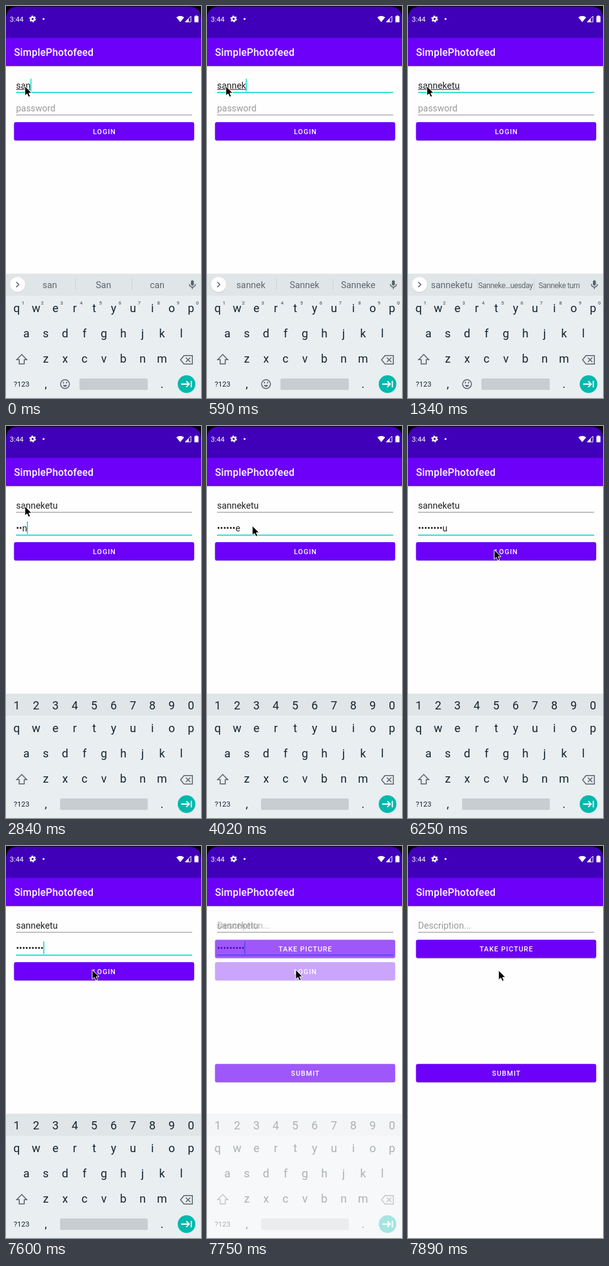
Animation, 310 px wide and 621 px high, one loop 8 s. Source, as an HTML page:

```html
<!DOCTYPE html>
<html lang="en">
<head>
<meta charset="utf-8">
<title>Login</title>
<style>
  html, body { margin: 0; width: 100%; height: 100%; overflow: hidden; background: #fefefe; }
  svg { display: block; width: 100%; height: 100%; font-family: Roboto, sans-serif; }
  .title { font-size: 16px; font-weight: 500; letter-spacing: .2px; fill: #fff; }
  .field { font-size: 14.4px; fill: #222; }
  .hint { font-size: 14.4px; fill: #999; }
  .label { font-size: 11px; font-weight: 500; letter-spacing: 1px; fill: #fff; text-anchor: middle; }
  .key { font-size: 18.2px; fill: #14242d; text-anchor: middle; }
  .sup { font-size: 8px; font-weight: 500; fill: #5c686f; text-anchor: middle; }
  .word { font-size: 14.4px; fill: #5c686f; text-anchor: middle; }
  .word.tight { font-size: 12.2px; letter-spacing: -.45px; }
  .icon { fill: none; stroke: #56636b; stroke-width: 1.5; }
</style>
</head>
<body>
<svg viewBox="0 0 310 621" preserveAspectRatio="none">
  <defs>
    <g id="bars">
      <rect width="310" height="60" fill="#08060c"/>
      <path d="M0 51V21Q0 1 20 1H290Q310 1 310 21V51Z" fill="#4000b9"/>
      <rect y="95" width="310" height="1" opacity=".2"/>
      <rect y="96" width="310" height="1.5" opacity=".06"/>
      <rect y="50.5" width="310" height="44.5" fill="#6c00f8"/>
      <text class="title" x="12.7" y="79">SimplePhotofeed</text>
      <g fill="#fff">
        <text x="6" y="24.7" font-size="11.4">3:44</text>
        <circle cx="42.3" cy="20.5" r="2.9" fill="none" stroke="#fff" stroke-width="2.3"/>
        <circle cx="42.3" cy="20.5" r="4.6" fill="none" stroke="#fff" stroke-width="1.5" stroke-dasharray="2.4 2.417"/>
        <circle cx="59.7" cy="20.5" r="1.6"/>
        <path d="M270.8 18Q277 13.6 283.2 18L277 25.6Z"/>
        <path d="M285 25.2L294 16V25.2Z" fill="none" stroke="#fff"/>
        <path d="M285 25.2L290.5 19.6V25.2Z"/>
        <path d="M299.5 16.2H301.3V15H304.2V16.2H306V25.7H299.5Z"/>
      </g>
    </g>
  </defs>

  <rect width="310" height="621" fill="#fefefe"/>
  <use href="#bars"/>
  <g id="login">
    <text class="field" id="user" x="16" y="130.7"></text>
    <rect id="composing" x="16" y="131.8" height="1" fill="#222"/>
    <rect id="userLine" x="16" width="280"/>
    <text class="hint" id="passHint" x="16" y="166.7">password</text>
    <text class="field" id="pass" x="16" y="166.7"></text>
    <rect id="passLine" x="16" width="280"/>
    <rect id="caret" width="1.6" height="20" fill="#12dcc8"/>
    <g data-button="LOGIN" data-y="184"></g>
    <rect id="ripple" x="12.7" y="184" width="286.5" height="29" rx="3" fill="#fff" opacity=".24"/>
  </g>

  <g id="keyboard">
    <rect y="424" width="310" height="197" fill="#e9eef1"/>
    <rect y="424" width="310" height="35" fill="#e0e5e8"/>
    <g id="textMode">
      <circle cx="18.3" cy="442" r="12.2" opacity=".12"/>
      <circle cx="18.3" cy="441.3" r="12" fill="#fff"/>
      <path class="icon" d="M16.3 437.2L20.4 441.3L16.3 445.4"/>
      <path d="M110.5 432V450M200.5 432V450" stroke="#cdd3d6"/>
      <text class="word" x="69.7" y="446.7"></text>
      <text class="word" x="155" y="446.7"></text>
      <text class="word" x="240.3" y="446.7"></text>
      <rect x="294" y="434.5" width="4.6" height="8.5" rx="2.3" fill="#56636b"/>
      <path class="icon" stroke-width="1.2" d="M291.5 440.5A4.8 4.8 0 0 0 301.1 440.5M296.3 445V448.5"/>
      <g id="sups"></g>
      <g class="icon">
        <circle cx="93.8" cy="599" r="7"/>
        <path d="M90 600.5Q93.8 606.2 97.6 600.5Z" fill="#56636b" stroke="none"/>
        <path d="M91.3 595.5V597.7M96.3 595.5V597.7" stroke-width="1.9"/>
      </g>
    </g>
    <g id="digits"></g>
    <g id="keys"></g>
    <text class="key" x="24.7" y="603" style="font-size:11.6px">?123</text>
    <rect id="space" y="590" height="18.3" rx="2" fill="#c8cdd1"/>
    <path class="icon" d="M25 552L33 560.3H29V567H21V560.3H17Z"/>
    <path class="icon" d="M277.5 560.5L283 553.7H296.3V567.3H283ZM286 557L293 564M293 557L286 564"/>
    <circle cx="287" cy="599" r="14" fill="#00b9ac"/>
    <path d="M278.5 599H291M286.6 594.3L291.3 599L286.6 603.7M294.6 593.7V604.3" fill="none" stroke="#fff" stroke-width="1.9"/>
  </g>

  <g id="compose">
    <rect width="310" height="621" fill="#fefefe"/>
    <use href="#bars"/>
    <text class="hint" x="16" y="130.7">Description...</text>
    <rect x="16" y="136.2" width="280" height="1" fill="#8b8b8b"/>
    <g data-button="TAKE PICTURE" data-y="148.5"></g>
    <g data-button="SUBMIT" data-y="345.3"></g>
  </g>

  <path id="mouse" d="M0 0V15.2L3.5 12L5.9 17.2L8.6 16L6.3 11H11Z" fill="#000" stroke="#fff"/>
</svg>
<script>
const LOOP = 8000;
const NAME = 'sanneketu';
const PITCH = 30.8;
const $ = id => document.getElementById(id);
const words = [...document.querySelectorAll('.word')];

function addText(parent, cls, x, y, text) {
  const el = document.createElementNS('http://www.w3.org/2000/svg', 'text');
  el.setAttribute('class', cls);
  el.setAttribute('x', x);
  el.setAttribute('y', y);
  el.textContent = text;
  parent.append(el);
}

function addRow(id, cls, text, x, y) {
  [...text].forEach((ch, i) => addText($(id), cls, x + i * PITCH, y, ch));
}

addRow('sups', 'sup', '1234567890', 27, 472.5);
addRow('digits', 'key', '1234567890', 17, 448.6);
addRow('keys', 'key', 'qwertyuiop', 17, 485);
addRow('keys', 'key', 'asdfghjkl', 32.4, 525);
addRow('keys', 'key', 'zxcvbnm', 63.2, 565);
addRow('keys', 'key', ',', 63.2, 605);
addRow('keys', 'key', '.', 248, 605);

document.querySelectorAll('[data-button]').forEach(g => {
  const y = +g.dataset.y;
  const box = (dy, style) => `<rect x="12.7" y="${y + dy}" width="286.5" height="29" rx="3" ${style}/>`;
  g.innerHTML = box(1.8, 'opacity=".07"') + box(.8, 'opacity=".14"') + box(0, 'fill="#6c00f8"');
  addText(g, 'label', 156.5, y + 18.6, g.dataset.button);
});

// Each step changes part of the state at its time and holds.
const steps = [[0, {
  user: 3, pass: 0, masked: false, onPass: false, caret: true,
  mouse: [30, 127], ripple: false, fade: 0
}]];
const at = (time, change) => steps.push([time, change]);

for (let i = 0; i < 6; i++) at(150 + 148 * i, { user: 4 + i });
at(1340, { caret: false });
at(1790, { caret: true });
at(2090, { onPass: true });
for (let i = 0; i < 7; i++) at(2540 + 148.3 * i, { pass: 1 + i });
at(3870, { caret: false, mouse: [39, 134] });
at(4020, { mouse: [72, 158] });
at(4170, { mouse: [110, 182] });
at(4320, { mouse: [132, 194], caret: true });
at(4470, { mouse: [138, 197] });
at(4770, { mouse: [137.5, 196.5], caret: false });
at(4920, { mouse: [137, 196], pass: 8, caret: true });
at(5370, { pass: 9 });
at(5960, { caret: false });
at(6100, { ripple: true });
at(6250, { ripple: false });
at(6400, { caret: true });
at(6850, { masked: true, caret: false });
at(7600, { caret: true });
at(7745, { fade: .65, mouse: [141, 196] });
at(7890, { fade: 1, mouse: [144, 197] });

const stateAt = t => Object.assign({}, ...steps.filter(s => s[0] <= t).map(s => s[1]));
const show = (id, on) => { $(id).style.display = on ? '' : 'none'; };

function suggestions(typed) {
  const cap = typed[0].toUpperCase() + typed.slice(1);
  if (typed.length === 3) return [typed, cap, 'can'];
  if (typed.length < 9) return [typed, cap, 'Sanneke'];
  return [typed, 'Sanneke…uesday', 'Sanneke turn'];
}

function setLine(id, y, focused) {
  $(id).setAttribute('y', focused ? y - .2 : y);
  $(id).setAttribute('height', focused ? 1.7 : 1);
  $(id).setAttribute('fill', focused ? '#12dcc8' : '#8b8b8b');
}

function draw(t) {
  const s = stateAt(t);
  const typed = NAME.slice(0, s.user);
  const hidden = s.masked ? s.pass : Math.max(0, s.pass - 1);
  $('user').textContent = typed;
  $('pass').textContent = '•'.repeat(hidden) + NAME.slice(hidden, s.pass);

  const active = $(s.onPass ? 'pass' : 'user');
  const width = active.textContent ? active.getComputedTextLength() : 0;
  $('caret').setAttribute('x', 15.6 + width);
  $('caret').setAttribute('y', s.onPass ? 151.2 : 115.2);
  $('composing').setAttribute('width', s.onPass ? 0 : width);
  setLine('userLine', 136.2, !s.onPass);
  setLine('passLine', 172.2, s.onPass);

  show('caret', s.caret);
  show('passHint', !s.pass);
  show('ripple', s.ripple);
  show('textMode', !s.onPass);
  show('digits', s.onPass);
  $('space').setAttribute('x', s.onPass ? 86 : 116.7);
  $('space').setAttribute('width', s.onPass ? 139.3 : 108.6);

  suggestions(typed).forEach((word, i) => {
    words[i].textContent = word;
    words[i].classList.toggle('tight', word.length > 9);
  });

  $('compose').style.opacity = s.fade;
  $('mouse').setAttribute('transform', `translate(${s.mouse})`);
}

const start = performance.now();
function tick() {
  draw((performance.now() - start) % LOOP);
  requestAnimationFrame(tick);
}
tick();
</script>
</body>
</html>
```
